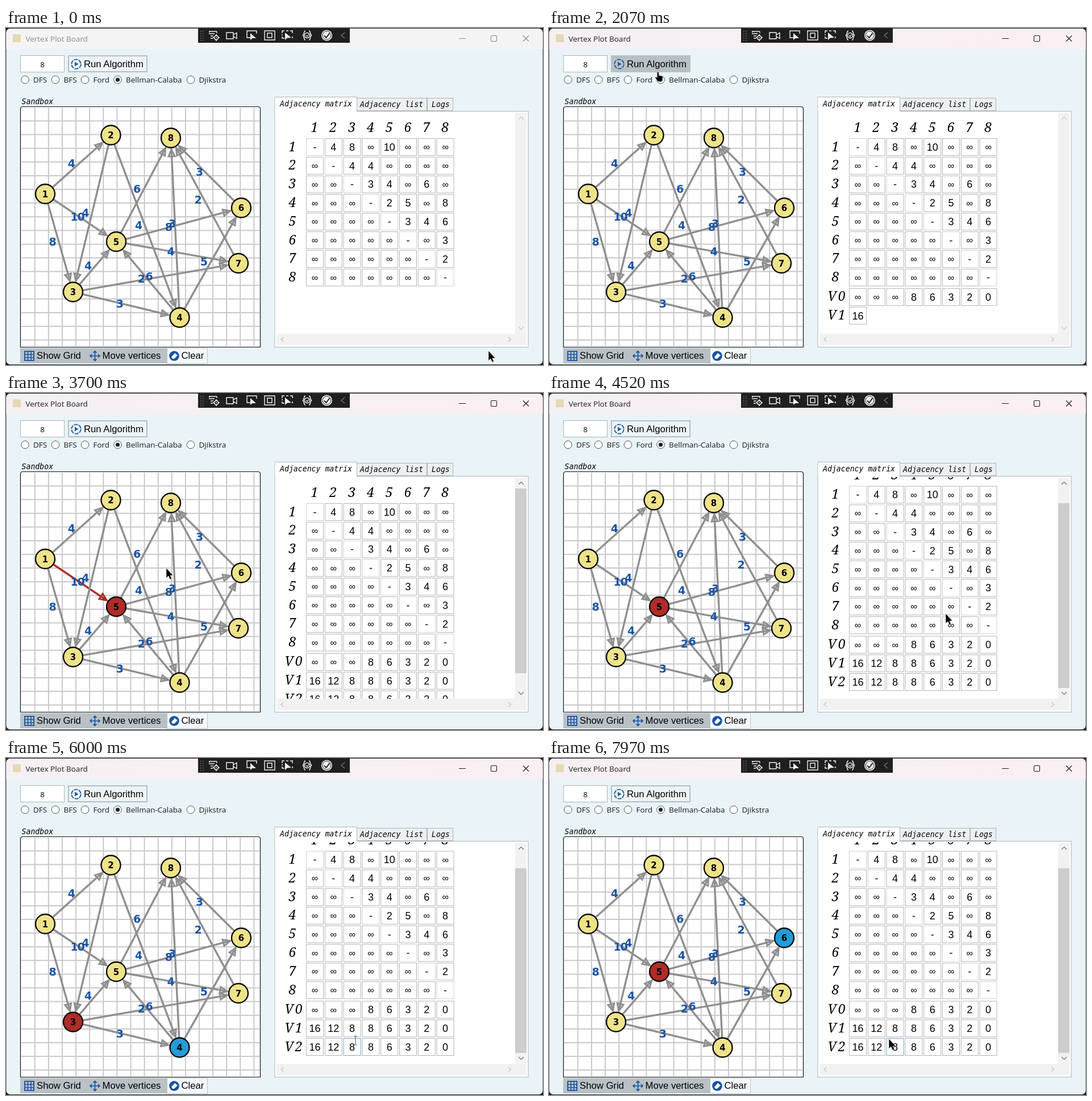
An HTML page that plays this animation: 945x593 px, repeating every 8000 ms.

```html
<!DOCTYPE html>
<html lang="en">
<head>
<meta charset="utf-8">
<title>Vertex Plot Board</title>
<style>
html, body { margin: 0; width: 100%; height: 100%; overflow: hidden; background: #1f1f1f; }
svg { display: block; width: 100vw; height: 100vh; }
text { white-space: pre; }
.ui { font: 13.5px "Open Sans", "Noto Sans", sans-serif; }
.btn { font: 16.7px "Liberation Sans", Arial, sans-serif; }
.mono { font: italic 13.2px "DejaVu Sans Mono", monospace; }
.head { font: italic 500 23px "Noto Serif", serif; text-anchor: middle; }
.cell { font: 18px "Liberation Sans", Arial, sans-serif; text-anchor: middle; }
.weight { font: bold 19px "DejaVu Sans", sans-serif; letter-spacing: -1.2px; fill: #1a55a6; }
.name { font: bold 15px "DejaVu Sans", sans-serif; text-anchor: middle; }
</style>
</head>
<body>
<svg id="stage" viewBox="0 0 945 593" preserveAspectRatio="none"></svg>
<script>
const LOOP = 8000, CLICK = 1500, CELL_MS = 68, STEP = 32.8;
const YELLOW = '#efe389', RED = '#b02c26', BLUE = '#229cd8', GRAY = '#8f8f8f';

const nodes = [[69, 292], [184.5, 188.5], [118, 464.5], [305.5, 509.5], [194, 376], [414, 316.5], [409, 414], [290, 193.5]];
const edges = '12:4 13:8 15:10 23:4 24:4 34:3 35:4 37:6 45:2 46:5 48:8 56:3 57:4 58:6 68:3 78:2'
  .split(' ').map(s => ({ from: s[0] - 1, to: s[1] - 1, weight: s.slice(3) }));
const vectors = ['∞ ∞ ∞ 8 6 3 2 0', '16 12 8 8 6 3 2 0', '16 12 8 8 6 3 2 0'].map(s => s.split(' '));

// [time, step]: each step tests one pair of vertices
const steps = [[3160, 0], [4520, 12], [5740, 23], [6000, 26], [6160, 27], [6450, 30], [6590, 31],
  [6840, 34], [6980, 35], [7180, 37], [7840, 43], [7970, 44]];
// [time, x, y]
const path = [[70, 849, 568], [840, 286, 124], [1000, 193, 61], [1600, 193, 61], [2270, 189, 84],
  [2600, 272, 302], [2740, 272, 302], [3090, 282, 308], [4040, 282, 308], [4400, 698, 388],
  [4900, 698, 388], [5450, 615, 497], [7720, 615, 497], [7840, 598, 494]];

const stage = document.getElementById('stage');
const range = n => [...Array(n).keys()];
const rect = (x, y, w, h, fill, more = '') => `<rect x="${x}" y="${y}" width="${w}" height="${h}" fill="${fill}" ${more}/>`;
const line = (d, stroke, w = 1, more = '') => `<path d="${d}" fill="none" stroke="${stroke}" stroke-width="${w}" ${more}/>`;
const text = (cls, x, y, s, more = '') => `<text class="${cls}" x="${x}" y="${y}" ${more}>${s}</text>`;
const dot = (x, y, r, fill, more = '') => `<circle cx="${x}" cy="${y}" r="${r}" fill="${fill}" ${more}/>`;
const stroke = (c, w = 1) => `stroke="${c}" stroke-width="${w}"`;

function along(keys, t) {
  if (t <= keys[0][0]) return keys[0].slice(1);
  const k = keys.findIndex(p => p[0] > t);
  if (k < 0) return keys[keys.length - 1].slice(1);
  const a = keys[k - 1], b = keys[k], f = (t - a[0]) / (b[0] - a[0]);
  return a.slice(1).map((v, n) => v + (b[n + 1] - v) * f);
}

function toolbar() {
  const w = '#f2f2f2';
  return rect(338, 0, 267, 26, '#1f1f1f') +
    range(10).map(n => rect(342 + n % 2 * 4, 5 + (n >> 1) * 4, 1.5, 1.5, '#777')).join('') +
    line('M357 6H371M357 10H367M360 14H365M360 18H364M358 6V8M371 6V9', w, 1.4) +
    dot(370, 17, 3.6, 'none', stroke(w, 1.6)) + dot(370, 17, 1, w) +
    line('M370 11V13M370 21V23M364 17H366M374 17H376', w, 1.6) +
    line('M388 8H400V19H388ZM400 12L406 8.500V18.500L400 15', w, 1.4) +
    line('M430 17H424V5H441V10', w, 1.4) + `<path d="M430 9V21L433.500 18 440 18Z" fill="${w}"/>` +
    line('M455 5H473V21H455ZM460 9H468V17H460Z', w, 1.4) +
    line('M486 9V5H490M500 5H504V9M504 15V18M490 18H486V15M493 5H497M486 11V13', w, 1.5) +
    `<path d="M491 8V21L495 17.500 502 17Z" fill="${w}"/>` +
    line('M527 5C523 5 526 12 522 13C526 14 523 21 527 21M533 5C537 5 534 12 538 13C534 14 537 21 533 21', w, 1.5) +
    dot(530, 13, 4.5, 'none', stroke(w, 1.4)) + line('M528 13L530 15 533 11', w, 1.2) +
    dot(564.5, 13, 9.5, w) + dot(564.5, 13, 7.4, w, stroke('#1f1f1f')) +
    line('M560 13.500L563.500 17 569.500 9', '#1f1f1f', 2) + line('M596 8L590 13 596 18', '#777', 1.3);
}

function radios() {
  return [['DFS', 33.5], ['BFS', 87], ['Ford', 139], ['Bellman-Calaba', 196.5], ['Djikstra', 325]]
    .map(([s, x], n) => dot(x, 91, 6.8, '#fff', stroke('#555')) + (n == 3 ? dot(x, 91, 3.6, '#222') : '') +
      text('ui', x + 14.5, 96, s, 'fill="#1c1c1c"')).join('');
}

function grid() {
  const at = range(17).map(k => 50.8 + k * 24.1);
  return '<path d="M25.500 561.500V142.500q0 -4 4 -4H443.500q4 0 4 4V561.500Z" fill="#fff" ' + stroke('#111', 1.2) + '/>' +
    line(at.map(x => `M${x} 140V560`).join('') + at.map(v => `M27 ${v + 112.7}H446.500`).join(''), '#c9c9c9', 2);
}

function footer() {
  const b = '#1753a4';
  return rect(25, 563, 116, 27, '#b9c1c5') + rect(141, 563, 142, 27, '#b9c1c5') +
    rect(283.5, 563.5, 71, 27, '#f4f8fa', stroke('#b9c3c8')) +
    rect(33, 569, 16, 16, 'none', stroke(b, 1.8)) + line('M38.500 569V585M44 569V585M33 574.500H49M33 580H49', b, 1.5) +
    line('M148 577H165M156.500 568.500V585.500M151 574L148 577 151 580M162 574L165 577 162 580M153.500 571.500L156.500 568.500 159.500 571.500M153.500 582.500L156.500 585.500 159.500 582.500', b, 1.7) +
    dot(296, 577, 8.8, b) + '<path d="M291 579L297 572 302 576 296 582 293 582Z" fill="#fff"/>' +
    text('btn', 54, 582, 'Show Grid') + text('btn', 169.5, 582, 'Move vertices') + text('btn', 308.5, 582, 'Clear');
}

function tabs() {
  const edge = stroke('#aeb5ba');
  return rect(473, 146.5, 446, 415, '#fff', edge) +
    rect(617.5, 123.5, 123, 22, '#edf0f1', edge) + rect(741.5, 123.5, 45, 22, '#edf0f1', edge) +
    line('M473 147V121.500H617.500V146', '#aeb5ba') + rect(473.5, 122, 143.5, 26, '#fff') +
    text('mono', 482, 137.5, 'Adjacency matrix') + text('mono', 623, 138.5, 'Adjacency list') + text('mono', 749, 138.5, 'Logs') +
    rect(896, 149, 20, 389, '#f2f2f2') + rect(476, 538, 440, 20, '#f2f2f2') +
    line('M488.500 544L484 548 488.500 552M884 544L888.500 548 884 552', '#c4c4c4', 1.2);
}

function cell(row, col, value, hot) {
  const x = 543.5 + col * STEP, y = 209.5 + row * STEP + (row > 7 ? 1.5 : 0);
  const infinite = value == '∞';
  return rect(x - 15, y - 15, 30, 30, '#fff', stroke(hot ? '#6ca9dc' : value == '-' ? '#d0d0d0' : '#b1b4ba')) +
    text('cell', x, y + (infinite ? 5.6 : 6.3), value, infinite ? 'style="font-size:16px"' : '');
}

function label(row, s) {
  const y = 216.5 + row * STEP + (row > 7 ? 1.5 : 0);
  return s.length > 1 ? text('head', 507.5, y, s, 'letter-spacing="3"') : text('head', 504, y, s);
}

const matrix = range(8).map(r => text('head', 543 + r * STEP, 182.5, r + 1) + label(r, String(r + 1)) +
  range(8).map(c => {
    const e = edges.find(e => e.from == r && e.to == c);
    return cell(r, c, r == c ? '-' : e ? e.weight : '∞');
  }).join('')).join('');

function table(t) {
  const count = t < CLICK ? 0 : Math.min(24, Math.floor((t - CLICK) / CELL_MS) + 1);
  const full = count > 16, scrolled = t >= 4400;
  const rows = vectors.map((v, r) => count > r * 8 ? label(8 + r, 'V' + r) +
    v.slice(0, count - r * 8).map((s, c) => cell(8 + r, c, s, t > 5400 && r == 2 && c == 2)).join('') : '').join('');
  return `<g clip-path="url(#view)"><g transform="translate(0 ${scrolled ? -30.5 : 0})">${matrix + rows}</g></g>` +
    (full ? rect(896, scrolled ? 194 : 168, 20, 325, '#cdcdcd') : '') +
    line('M902 161L906.500 156.500 911 161M902 526L906.500 530.500 911 526', full ? '#707070' : '#c4c4c4', 1.2);
}

function arrow({ from, to }, color) {
  const [x, y] = nodes[from], [u, v] = nodes[to];
  const len = Math.hypot(u - x, v - y), angle = Math.atan2(v - y, u - x) * 180 / Math.PI;
  return `<g transform="translate(${x} ${y}) rotate(${angle})">` +
    line(`M17 0H${len - 21}`, color, 3.4) + line(`M${len - 20} 0l-12.500 -5.500v11z`, color, 3) + '</g>';
}

function graph(t) {
  const k = t < steps[0][0] ? -1 : Math.floor(along(steps, t)[0] + 1e-6);
  const base = k < 0 ? -1 : k >> 3, probe = k < 0 ? -1 : k & 7;
  const paint = n => n == probe ? RED : n == base && probe < base ? BLUE : YELLOW;
  return edges.map(e => arrow(e, e.from == base && e.to == probe ? RED : GRAY)).join('') +
    edges.map(e => {
      const [x, y] = nodes[e.from], [u, v] = nodes[e.to];
      return text('weight', (x + u) / 2 - 18, (y + v) / 2 + 5, e.weight);
    }).join('') +
    nodes.map(([x, y], n) => dot(x, y, 17, paint(n), stroke('#0b0b0b', 2.4)) + text('name', x, y + 5.5, n + 1)).join('');
}

function titleBar(active) {
  const ink = active ? '#1b1b1b' : '#8b8b8b';
  return rect(0, 1, 945, 36, active ? 'url(#mica)' : '#f4f4f5') +
    rect(12, 11, 14, 14, '#e6d9b4') +
    text('ui', 34.5, 23.5, 'Vertex Plot Board', `fill="${ink}"`) +
    line('M797 18.500H809M910 13.500L920 23.500M920 13.500L910 23.500', ink, 1.1) +
    rect(853.5, 13.5, 10, 10, 'none', 'rx="1.5" ' + stroke(ink, 1.1));
}

function runButton(hover) {
  const b = '#1f5f9e';
  return rect(110, 49, 138, 28, hover ? '#b9c0c4' : '#eef4f6', stroke(hover ? '#b9c0c4' : '#b4bec3', 2)) +
    dot(123.5, 63.5, 8.2, 'none', stroke(b, 1.8) + ' stroke-dasharray="7 1.600"') +
    `<path d="M121 59.500L127.500 63.500 121 67.500Z" fill="${b}"/>` + text('btn', 137, 69, 'Run Algorithm');
}

function cursor(t, x, y, hover) {
  const shape = hover
    ? '<path d="M0 1Q1.500 -1 3 1V6L9 7.500Q10.500 8 10 11L8.500 17H1.500L-3.500 10Q-3 8 0 10Z" fill="#000" stroke="#fff" stroke-width=".5"/>'
    : t > 5400 && t < 7760
      ? line('M-2.500 -8H-1L0 -7 1 -8H2.500M0 -7V7M-2.500 8H-1L0 7 1 8H2.500', '#555')
      : '<path d="M0 0V17.500L4 14 6.500 20 9.500 18.700 7 13H12Z" fill="#000" stroke="#fff" stroke-width=".6"/>';
  return `<g transform="translate(${x} ${y})">${shape}</g>`;
}

const defs = '<defs><clipPath id="view"><rect x="475" y="148" width="421" height="390"/></clipPath>' +
  '<clipPath id="win"><rect x="0.500" y="1" width="944" height="591" rx="7"/></clipPath>' +
  '<linearGradient id="mica"><stop stop-color="#f5f0f4"/><stop offset="1" stop-color="#faeff3"/></linearGradient></defs>';
const body = rect(0, 1, 945, 592, '#e9f3f8');
const fixed = rect(25.5, 48.5, 77, 29, '#fff', stroke('#abb3ba')) + text('ui', 64, 68.5, '8', 'text-anchor="middle"') +
  radios() + text('mono', 27.5, 133.5, 'Sandbox') + grid() + footer() + tabs();
const tools = toolbar();

function draw(t) {
  const [x, y] = along(path, t);
  const hover = x > 109 && x < 249 && y > 48 && y < 78;
  stage.innerHTML = defs + rect(0, 0, 945, 593, '#1f1f1f') +
    `<g clip-path="url(#win)">${body + titleBar(t >= CLICK) + fixed + runButton(hover) + graph(t) + table(t)}</g>` +
    tools + cursor(t, x, y, hover);
}

const start = performance.now();
function tick() {
  draw((performance.now() - start) % LOOP);
  requestAnimationFrame(tick);
}
tick();
</script>
</body>
</html>
```
